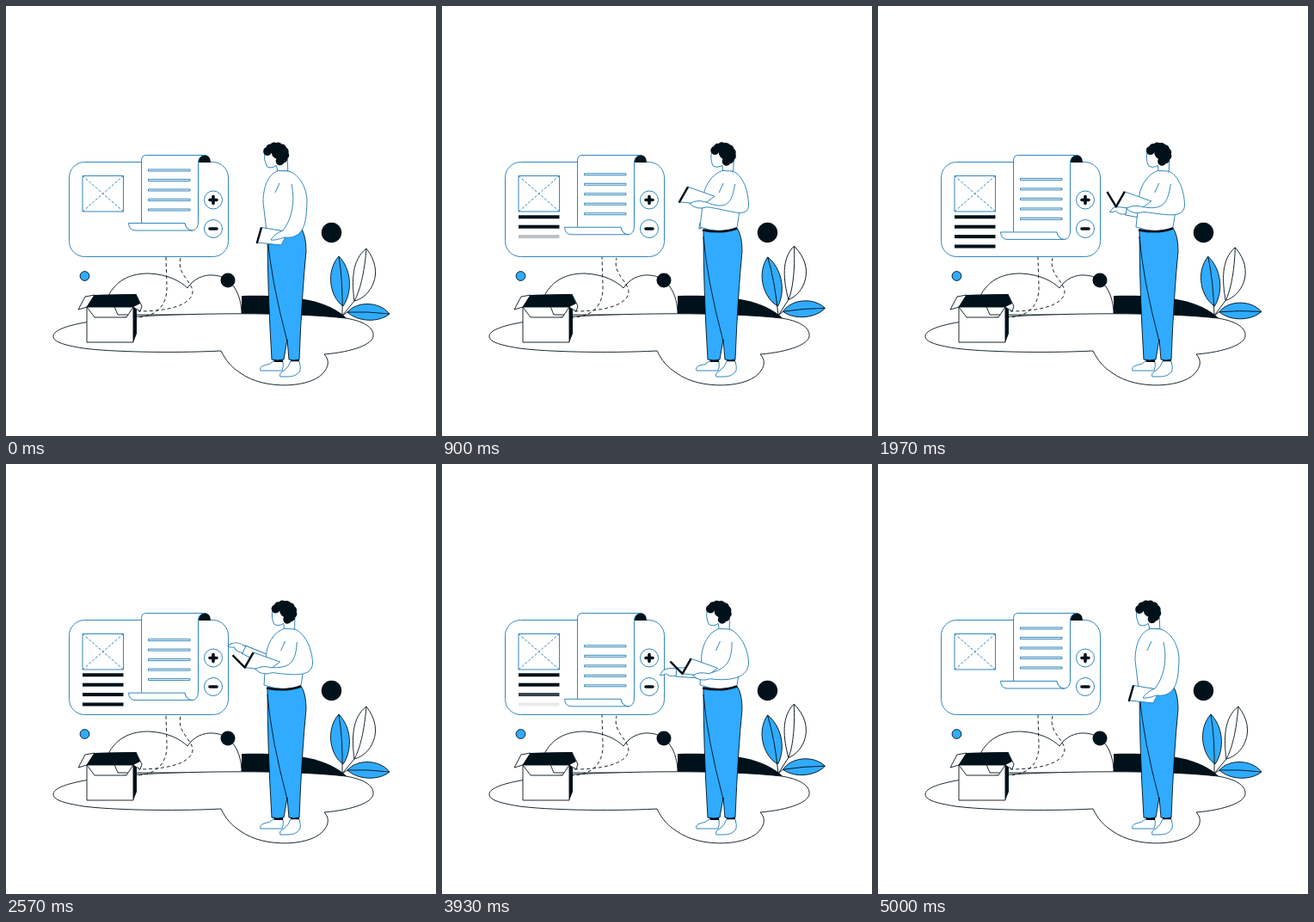
Animation of 500x500 px, one loop 5.03 s. Source, as an HTML page:

```html
<!DOCTYPE html>
<html lang="en">
<head>
<meta charset="utf-8">
<title>Order form illustration</title>
<style>
html, body { margin: 0; width: 100%; height: 100%; overflow: hidden; background: #fff; }
svg { display: block; width: 100vw; height: 100vh; }
.ink, .blue { fill: #fff; stroke: #00111a; stroke-width: .9; stroke-linejoin: round; }
.blue { stroke: #1c7ab5; }
.dark { fill: #00111a; }
.sky { fill: #30abff; }
.open { fill: none; }
.thick, .sign { fill: none; stroke: #00111a; stroke-width: 2.5; stroke-linejoin: round; }
.sign { stroke-width: 3.6; stroke-linecap: round; }
.dash { stroke-dasharray: 4 3; animation: flow 5.03s linear infinite; }
@keyframes flow { to { stroke-dashoffset: -70; } }
</style>
</head>
<body>
<svg viewBox="0 0 500 500">
  <!-- clouds, hill, ground -->
  <path class="ink" d="M120 335C132 314 152 311 166 311C188 312 203 320 211 328C218 317 230 312 241 313C262 314 274 334 274 359H130Z"/>
  <path class="dark" d="M274 337C320 336 372 338 397 364L274 360Z"/>
  <path class="ink" d="M55 384C55 370 120 361 200 359C260 357 340 357 395 363C420 367 428 376 427 384C426 393 405 402 370 405C375 410 376 417 371 424C358 445 300 447 273 427C262 420 256 413 250 401C190 404 120 402 90 398C65 394 55 390 55 384Z"/>
  <circle class="dark" cx="258" cy="319" r="8.5"/>
  <circle class="dark" cx="378.5" cy="263.5" r="11.7"/>
  <circle class="ink sky" cx="91.5" cy="314" r="5.4"/>
  <path class="ink open dash" d="M186 292L187 325C188 345 178 361 152 362"/>
  <path class="ink open dash" d="M203 293C198 312 217 320 217 333C215 349 185 355 154 355"/>

  <!-- open box -->
  <path class="ink" d="M103 336L92 338L84 353L94 350Z"/>
  <path class="dark" d="M103 336L151 335L154 348L148 350H94ZM148 350L152 353V381L148 391Z"/>
  <path class="ink" d="M94 350H148V391H94ZM94 350L103 362H140L148 350"/>
  <path class="ink" d="M151 335L158 349L156 355L148 350Z"/>
  <path class="dark" d="M103 336L151 335L156 346L148 350H94Z"/>

  <!-- card -->
  <rect class="blue" x="73.5" y="181.5" width="185" height="110" rx="18"/>
  <rect class="blue" x="89" y="197.5" width="47.5" height="41.5"/>
  <path class="blue open" stroke-dasharray="3 2" d="M89 197.5L136.5 239M136.5 197.5L89 239"/>
  <g id="bars" class="dark"></g>
  <circle class="blue" cx="241" cy="225.5" r="10.5"/>
  <circle class="blue" cx="241" cy="259" r="10.5"/>
  <path class="sign" d="M237 225.5H245M241 221.5V229.5M237 259H245"/>

  <!-- paper -->
  <path class="dark" d="M223 182V178Q224 173 231 173Q238 174 238 182Z"/>
  <path class="blue" d="M157.5 245V180Q157.5 173.5 163 173.5H231Q223.5 174 223.5 183V245"/>
  <g id="scroll">
    <path fill="#fff" d="M157.5 215H223.5V253H157.5Z"/>
    <path class="blue open" d="M157.5 215V252M223.5 215V252"/>
    <path class="blue" d="M142.5 252.5H208Q210 261 217 261H150Q143 260.5 142.5 252.5Z"/>
    <path class="blue" d="M208 252.5Q210 261 217 261Q223.5 260 223.5 251"/>
    <g id="rows" class="blue"></g>
  </g>

  <!-- plant -->
  <g id="plant">
    <path class="ink" d="M419 282C402 295 402 320 405 343C423 339 442 311 419 282Z"/>
    <path class="ink sky" d="M392 349C377 339 371 309 387 291C401 305 404 331 392 349Z"/>
    <path class="ink sky" d="M397 356C408 343 434 343 446 358C434 368 410 368 397 356Z"/>
    <path class="ink open" d="M419 282C417 310 411 333 405 343L391 360Q392 320 387 291M446 358Q420 355 397 356L391 360"/>
  </g>

  <!-- person -->
  <g id="farArm" class="blue">
    <path id="sleeve"/>
    <path d="M12 -4Q2 -6 -4 -1L-7 4Q-4 5 0 2Q4 6 12 4Z"/>
  </g>
  <path class="blue" d="M311 413L322 413Q323 420 321 424H296Q294 420 300 418Q307 417 311 413Z"/>
  <path class="blue" d="M331 413H341Q343 420 342 424Q338 431 328 431H319Q317 427 323 424Q329 420 331 413Z"/>
  <path class="dark" d="M311 410H322V414H312ZM331 410H341V413H331Z"/>
  <path class="ink sky" d="M304 260Q304 330 309 411Q316 413 323 411L327 388L329 411Q335 413 341 411Q344 335 349 285Q349 267 343 258Z"/>
  <path class="ink open" d="M304 268Q308 318 327 390"/>
  <g id="head">
    <path class="blue" d="M307 169Q305 178 309 186Q314 189 320 185L321 192H333V178L320 166Z"/>
    <g id="hair" class="dark"><circle cx="323" cy="170" r="8"/></g>
  </g>
  <path id="shirt" class="blue"/>
  <path class="thick" d="M303 260.5Q325 265 343 258.5"/>
  <path id="page" class="blue"/>
  <path id="cover" class="thick"/>
  <path id="nearArm" class="blue"/>
</svg>
<script>
const LOOP = 5030;
const $ = id => document.getElementById(id);
const clamp = v => Math.min(1, Math.max(0, v));
const ramp = (a, b, t) => clamp((t - a) / (b - a));
const ease = (a, b, t) => { const p = ramp(a, b, t); return p * p * (3 - 2 * p); };
const mix = (a, b, p) => a + (b - a) * p;

function add(parent, tag, attrs) {
  const el = document.createElementNS('http://www.w3.org/2000/svg', tag);
  for (const key in attrs) el.setAttribute(key, attrs[key]);
  return $(parent).appendChild(el);
}
const put = (id, transform) => $(id).setAttribute('transform', transform);
const draw = (id, d) => $(id).setAttribute('d', d);

const bars = [];
for (let i = 0; i < 4; i++)
  bars.push(add('bars', 'rect', { x: 89, y: 243.3 + 11.4 * i, width: 47.5, height: 4 }));
for (let i = 0; i < 5; i++)
  add('rows', 'rect', { x: 165.5, y: 190 + 11.5 * i, width: 48.5, height: 2 });
for (let i = 0; i < 9; i++) {
  const a = (205 + 27.5 * i) * Math.PI / 180;
  add('hair', 'circle', { cx: 320 + 10.5 * Math.cos(a), cy: 172 + 9 * Math.sin(a), r: 5 });
}

// stops of the pointing hand: time, x, y
const reach = [[700, 308, 250], [1370, 288, 262], [2570, 266, 211],
  [3430, 255, 217], [4370, 265, 262], [4900, 308, 255]];

function handAt(t) {
  const i = reach.findIndex(stop => stop[0] > t);
  if (i < 1) return null;
  const [a, b] = [reach[i - 1], reach[i]];
  const p = ease(a[0], b[0], t);
  return [mix(a[1], b[1], p), mix(a[2], b[2], p)];
}

function drawScene(t) {
  bars.forEach((bar, i) => {
    const shown = ramp(140 + 322 * i, 580 + 322 * i, t);
    const gone = ramp(4460 - 310 * i, 4900 - 310 * i, t);
    bar.setAttribute('opacity', shown - gone);
  });
  put('scroll', `translate(0 ${0.0053 * Math.min(t, 3950) * (1 - ease(3950, 5000, t))})`);

  const u = t / (LOOP / 2) % 1;
  const swing = Math.sin(Math.PI * (u + 0.04 * Math.sin(Math.PI * u) ** 2)) ** 2;
  put('plant', `rotate(${-7.8 * swing} 391 360)`);
}

function drawFarArm(t) {
  const hand = handAt(t);
  $('farArm').style.display = hand ? '' : 'none';
  if (!hand) return;
  const [x, y] = hand;
  const dx = 318 - x, dy = 249 + (y - 262) * 0.28 - y;
  put('farArm', `translate(${x} ${y}) rotate(${Math.atan2(dy, dx) * 180 / Math.PI})`);
  draw('sleeve', `M11 -5L${Math.hypot(dx, dy)} -7V7L11 5Z`);
}

function drawPerson(t) {
  const up = ease(0, 900, t) - ease(4400, 5000, t);
  const lift = up * up;
  const lean = up * (11.5 + 4 * Math.cos(Math.PI * (t - 1370) / 2060));

  put('head', `translate(${(lean - 7) * 0.75} ${up * 0.6}) rotate(${(lean - 7) * 0.4} 326 191)`);

  // shirt, from collar to hem
  const neck = 317 + 0.63 * lean, back = 329 + 0.6 * lean;
  const side = 299 + 0.3 * lean, hem = 262 - 5 * lift;
  draw('shirt', `M${neck} 191.5C${neck - 12} 195 ${side} 210 ${side} 228
    L${303 - 3 * lift} ${hem}Q325 266 343 257.5L348 225L${back} 192Z
    M${neck + 1} 206l-5 11`);

  // tablet hinged at its lower left corner
  const x = 292 - up * (16 - 0.0014 * Math.max(0, t - 1370));
  const y = 275 - lift * (52 - 0.0053 * t);
  const ex = 5 + 5 * up, ey = -17.5;
  draw('page', `M${x} ${y}l${ex} ${ey}l31 ${5 + 6 * lift}L${x + 28} ${y + 3}Z`);
  const turn = -1.3 * (ease(1100, 2300, t) - ease(3950, 4850, t));
  const c = Math.cos(turn), s = Math.sin(turn);
  draw('cover', `M${x + ex * c - ey * s} ${y + ex * s + ey * c}L${x} ${y}l${ex} ${ey}`);

  // near arm: shoulder, elbow, wrist, fingers, back to the armpit
  const elbow = 350 + 6.5 * up, low = 228 + 4 * up;
  const wristY = y - 6 + 12 * lift, topY = y - 14 + 14 * lift;
  draw('nearArm', `M${back} 192C${back + 12} 196 ${elbow} ${low - 17} ${elbow} ${low}
    C${elbow - 1} ${low + 16} ${x + 58} ${wristY + 3} ${x + 32} ${wristY}
    Q${x + 20} ${wristY + 4} ${x + 16 - 4 * up} ${y - 3 + 5 * up}
    Q${x + 20} ${y - 10 + 7 * lift} ${x + 30} ${topY}
    C331 ${mix(250, 238, up)} 337 230 ${back + 3} 207`);
}

const start = performance.now();
function frame() {
  const t = (performance.now() - start) % LOOP;
  drawScene(t);
  drawFarArm(t);
  drawPerson(t);
  requestAnimationFrame(frame);
}
frame();
</script>
</body>
</html>
```
